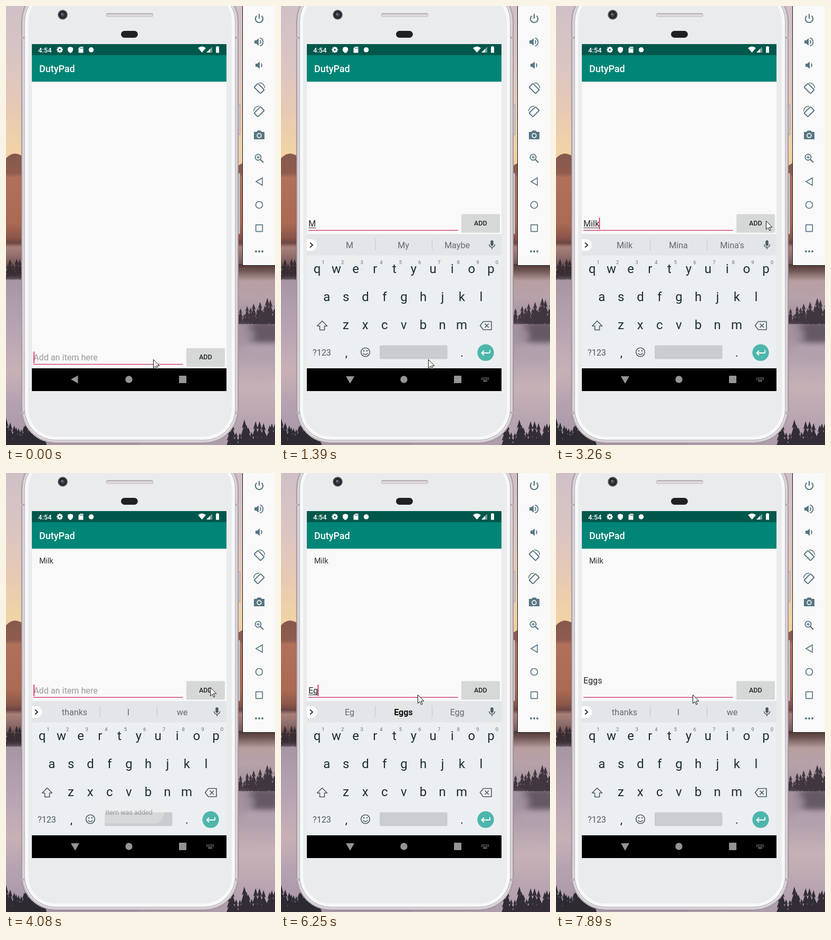
These frames come from a looping animation (510 px wide and 830 px high, 8 s). An HTML page:

```html
<!DOCTYPE html>
<html lang="en">
<head>
<meta charset="utf-8">
<title>To-do list demo</title>
<style>
html, body { margin: 0; height: 100%; overflow: hidden; background: #b9a8b4; }
svg { display: block; }
text { font-family: Roboto, sans-serif; white-space: pre; }
</style>
</head>
<body>
<svg id="stage" width="510" height="830" viewBox="0 0 510 830"></svg>
<script>
const LOOP = 8000;
const stage = document.getElementById('stage');

// Markup helpers
const rect = (x, y, w, h, fill, more = '') => `<rect x="${x}" y="${y}" width="${w}" height="${h}" fill="${fill}" ${more}/>`;
const circle = (x, y, r, fill, more = '') => `<circle cx="${x}" cy="${y}" r="${r}" fill="${fill}" ${more}/>`;
const path = (d, fill, more = '') => `<path d="${d}" fill="${fill}" ${more}/>`;
const line = (d, color, w, more = '') => path(d, 'none', `stroke="${color}" stroke-width="${w}" ${more}`);
const label = (x, y, size, fill, str, more = '') => `<text x="${x}" y="${y}" font-size="${size}" fill="${fill}" ${more}>${str}</text>`;
const group = (inner, more = '') => `<g ${more}>${inner}</g>`;
const at = (x, y, inner) => group(inner, `transform="translate(${x} ${y})"`);
const fog = (x, y, rx, ry, fill, o) => `<ellipse cx="${x}" cy="${y}" rx="${rx}" ry="${ry}" fill="${fill}" opacity="${o}" filter="url(#soft)"/>`;
const mid = 'text-anchor="middle"';

let seed = 7;
const rnd = () => (seed = (seed * 16807) % 2147483647) / 2147483647;

// Overlapping firs between x0 and x1, each with three ragged tiers
function trees(x0, x1, base, height, fill) {
  let d = '';
  for (let x = x0; x < x1; x += 3 + rnd() * 5) {
    const h = height(x) * (0.5 + rnd() * 0.5), w = 3 + h * 0.13;
    d += `M${x} ${base - h}`;
    for (const side of [1, -1]) {
      const tiers = side > 0 ? [0.3, 0.6, 1] : [1, 0.6, 0.3];
      for (const k of tiers) {
        const out = `L${x + side * w * (0.25 + k * 0.75)} ${base - h * (1 - k)}`;
        const notch = `L${x + side * w * k * 0.5} ${base - h * (1 - k) - h * 0.04}`;
        d += side > 0 ? out + notch : notch + out;
      }
    }
    d += 'Z';
  }
  return path(d, fill);
}

function gradient(id, stops) {
  return `<linearGradient id="${id}" x1="0" y1="0" x2="0" y2="830" gradientUnits="userSpaceOnUse">` +
    stops.map(([y, c]) => `<stop offset="${y / 830}" stop-color="${c}"/>`).join('') + '</linearGradient>';
}

function landscape() {
  return `<defs>
    <filter id="soft" x="-50%" y="-100%" width="200%" height="300%"><feGaussianBlur stdDeviation="6"/></filter>
    ${gradient('sky', [[0, '#cfc0c6'], [110, '#dbc5c3'], [200, '#e8cab4'], [275, '#f1d3a6'], [310, '#efcb9c']])}
    ${gradient('hill', [[280, '#86594e'], [316, '#8f5c4f'], [324, '#b0705a'], [410, '#ab6a52'], [438, '#8a564a'], [448, '#6d4644'], [456, '#a98078'], [474, '#8f6d6c'], [500, '#5d4446']])}
    ${gradient('mist', [[490, '#8c7580'], [525, '#a897a5'], [620, '#b9a5b3'], [690, '#c9b0b6'], [750, '#b5a2b1'], [830, '#a695a5']])}
    ${gradient('mistR', [[488, '#4f3838'], [500, '#6d5351'], [520, '#b89e9f'], [550, '#b7a2aa'], [600, '#a08e9b'], [670, '#b4a3af'], [720, '#c7b1b7'], [830, '#ad9cab']])}
    </defs>` +
    rect(0, 0, 510, 830, 'url(#sky)') +
    path('M0 288Q8 279 18 279Q28 280 36 288H430V308L450 296V510H0Z', 'url(#hill)') +
    rect(0, 496, 250, 340, 'url(#mist)') +
    rect(250, 488, 260, 342, 'url(#mistR)') +
    trees(-4, 40, 518, () => 46, '#382d33') +
    fog(16, 526, 34, 9, '#a897a5', 0.9) +
    fog(492, 618, 40, 22, '#564b57', 0.8) +
    trees(436, 514, 602, x => 28 + (x - 436) * 0.4, '#40363f') +
    fog(448, 622, 24, 18, '#a493a1', 0.8) + fog(490, 650, 40, 12, '#b4a3af', 0.8) +
    trees(-4, 76, 836, x => 60 - x * 0.2, '#2d2a32') +
    trees(424, 514, 836, () => 54, '#322d36');
}

function phone() {
  const shell = (d, fill, more) => rect(29 + d, -36 + d, 412 - 2 * d, 863 - 2 * d, fill, `rx="${65 - d}" ${more || ''}`);
  return rect(440, 187, 3.5, 56, '#d8d3d8', 'stroke="#8f868e" stroke-width=".8"') +
    rect(440, 316, 3.5, 115, '#d8d3d8', 'stroke="#8f868e" stroke-width=".8"') +
    shell(0.5, '#cfc8ce', 'stroke="#897f87"') +
    shell(3, '#e9e5e9', 'stroke="#b5acb4" stroke-width=".8"') +
    shell(6, '#f4f3f5', 'stroke="#9f969e"') +
    shell(8, '#f7f8f9') +
    shell(13, '#e9ebed') +
    [58, 767].map(y => rect(29, y, 7, 4, '#b9b0b8') + rect(434, y, 7, 4, '#b9b0b8')).join('') +
    circle(107.5, 16.5, 9.3, '#55535a') + circle(107.5, 16.5, 7.3, '#26272c') +
    circle(107.5, 16.5, 3.6, '#474b58') + circle(106, 15, 1.3, '#9297a5') +
    rect(190.5, 14, 88, 6, '#dedadd', 'rx="2" stroke="#bdb5ba"') +
    rect(191, 14, 87, 1.4, '#a9a1a6') +
    rect(218, 47, 32, 13, '#202124', 'rx="6.5"');
}

function appBars() {
  let gear = '';
  for (let a = 0; a < 360; a += 45) gear += rect(-1.3, -5.8, 2.6, 4, '#fff', `transform="rotate(${a})"`);
  return rect(49, 72, 369, 613, '#f9f9f9') + rect(49, 143, 369, 1.5, '#e6eceb') +
    rect(49, 72, 369, 21, '#00574b') + rect(49, 93, 369, 50, '#008577') +
    label(61, 87.5, 13, '#fff', '4:54', 'font-weight="500"') +
    at(102, 82.7, gear + circle(0, 0, 3.2, 'none', 'stroke="#fff" stroke-width="2.4"')) +
    path('M122 77L127 79V83Q126.500 87 122 89Q117.500 87 117 83V79Z', '#fff') +
    path('M140.500 77H146.500V88.500H137.500V80Z', '#fff') +
    line('M141 78.500V81M143 78.500V81M145 78.500V81', '#00574b', 0.9) +
    circle(161.5, 82.8, 4.8, '#fff') +
    path('M364 79.500Q371.500 73.500 379 79.500L371.500 88Z', '#fff') +
    path('M391 77V88H380Z', '#6f9f97') + path('M387 81V88H380Z', '#fff') +
    path('M399.500 77V76H402.500V77H404V88.500H398V77Z', '#fff') +
    label(63, 125.3, 17.96, '#fff', 'DutyPad', 'font-weight="500"');
}

function sidePanel() {
  const c = '#587682';
  const speaker = path('M-7 -3H-3.500L1 -7V7L-3.500 3H-7Z', c);
  const turn = rect(-5, -8.5, 10, 17, 'none', `rx="1" stroke="${c}" stroke-width="2" transform="rotate(-45)"`) +
    line('M0 -10.700Q9.500 -10.500 10.700 -1', c, 1.5);
  const icons = [
    line('M-4.600 -5.500A7.200 7.200 0 1 0 4.600 -5.500M0 -9V0', c, 2.2),
    at(-2, 0, speaker + line('M3.500 -3.500Q6.500 0 3.500 3.500M3.500 -7.700A8 8 0 0 1 3.500 7.700', c, 1.8)),
    speaker + line('M3.500 -3.500Q6.500 0 3.500 3.500', c, 1.8),
    turn,
    group(turn, 'transform="scale(-1 1)"'),
    path('M-10 -6H-5L-3 -8.500H3L5 -6H10V8H-10Z', c) + circle(0, 1, 4.7, '#f9f9f9') + circle(0, 1, 3, c),
    circle(-2, -2, 5.6, 'none', `stroke="${c}" stroke-width="1.8"`) + line('M2 2L8 8', c, 2.4) + line('M-5 -2H1M-2 -5V1', c, 1.3),
    line('M-6 0L6 -7V7Z', c, 1.6),
    circle(0, 0, 6.5, 'none', `stroke="${c}" stroke-width="1.7"`),
    rect(-6.3, -6.3, 12.6, 12.6, 'none', `stroke="${c}" stroke-width="1.7" rx=".6"`),
    [-6, 0, 6].map(x => circle(x, 0, 2, c)).join('')
  ];
  return rect(448.5, -2, 64, 492.5, '#f9f9f9', 'stroke="#111"') +
    icons.map((icon, i) => at(480, 24 + 44 * i, icon)).join('');
}

function keys(caps) {
  const step = 36.6, ink = '#1d2c33';
  const row = (letters, x, y) => [...letters].map((k, i) =>
    label(x + step * i, y, 24, ink, caps ? k.toUpperCase() : k, mid)).join('');
  const digits = [...'1234567890'].map((k, i) => label(80 + step * i, 488, 9.5, '#657076', k, mid)).join('');
  return row('qwertyuiop', 68.5, 505) + digits + row('asdfghjkl', 86.7, 557.7) + row('zxcvbnm', 123, 610.5) +
    path('M78 595.500L87.500 605H82.500V612.500H73.500V605H68.500Z', caps ? '#4d5a61' : 'none',
      'stroke="#4d5a61" stroke-width="1.6" stroke-linejoin="round"');
}

function keyboard() {
  const c = '#4d5a61';
  return rect(49, 431, 369, 254, '#ebeff1') + rect(49, 431, 369, 40.5, '#e2e6e9') +
    path('M49 441H57A11 11 0 0 1 57 463H49Z', '#fff') +
    line('M55 447.500L60 452L55 456.500', '#222', 1.7) +
    line('M178.500 440V462M286.500 440V462', '#c3c8cb', 1) +
    rect(397.3, 443, 5.4, 10.5, c, 'rx="2.7"') + line('M394.500 450.500Q395 456 400 456Q405 456 405.500 450.500M400 456V460', c, 1.5) +
    '<g id="sug"></g><g id="keys"></g>' +
    line('M383.500 596.500H399V612H383.500L377.500 604.200Z', c, 1.6, 'stroke-linejoin="round"') +
    line('M386.500 600.500L394 608M394 600.500L386.500 608', c, 1.6) +
    label(77.5, 660.5, 16.2, c, '?123', mid) + label(124, 663, 22, '#1d2c33', ',', mid) + label(343, 663, 22, '#1d2c33', '.', mid) +
    circle(160, 654.5, 8.3, 'none', `stroke="${c}" stroke-width="1.6"`) +
    circle(157, 652, 1.3, c) + circle(163, 652, 1.3, c) + line('M155.500 656.500Q160 662 164.500 656.500', c, 1.4) +
    rect(187, 641.5, 128.5, 26, '#c9cdd0', 'rx="2.5"') +
    circle(388, 655.3, 15.7, '#4db6ac') +
    line('M396 650.500V656H381M385 651.500L380.500 656L385 660.500', '#fff', 1.8);
}

function navBar() {
  const g = '#959595';
  let pad = '';
  for (let r = 0; r < 2; r++) for (let i = 0; i < 5; i++) pad += rect(380 + i * 3, 702.5 + r * 2.7, 1.7, 1.6, g);
  return rect(49, 685, 369, 43, '#000') +
    path('M136.500 698.500V713.500L123 706Z', g, 'id="back"') +
    group(path('M123 700H139L131 714Z', g) + pad + rect(383, 708.2, 8, 1.6, g), 'id="hide"') +
    circle(233, 706, 6.7, g) + rect(328, 699, 14, 14, g, 'rx=".8"');
}

const inputRow = () =>
  line('M52 424.200H335.500', '#d14a7c', 1.5) +
  rect(342, 394.5, 73, 34.5, '#000', 'rx="2" opacity=".1"') +
  rect(342, 393.5, 73, 34, '#d6d7d7', 'rx="2"') +
  circle(387, 411, 30, '#000', 'id="ripple" clip-path="url(#button)"') +
  label(378.3, 415, 12.57, '#242424', 'ADD', 'text-anchor="middle" font-weight="500"') +
  label(52, 417, 16.16, '#9a9a9a', 'Add an item here', 'id="hint"') +
  label(52, 417, 16.16, '#262626', '', 'id="entry"') +
  rect(52, 419, 0, 1, '#333', 'id="under"') +
  rect(52.2, 400, 1.6, 22, '#d81b60', 'id="caret"');

stage.innerHTML = landscape() + phone() + appBars() + sidePanel() +
  '<clipPath id="button"><rect x="342" y="393.500" width="73" height="34" rx="2"/></clipPath>' +
  label(63, 170.5, 14.37, '#333', 'Milk', 'id="item"') +
  group(inputRow(), 'id="row"') + navBar() + group(keyboard(), 'id="kb"') +
  group(rect(168, 622, 131.5, 41, '#eeeeee', 'rx="20.500"') + label(233.3, 646, 12.57, '#2b2b2b', 'Item was added', mid), 'id="toast"') +
  group(path('M0 0V16L3.800 12.600L6.300 18.300L8.500 17.300L6.100 11.700H11.300Z', '#fff', 'stroke="#111" stroke-linejoin="round"'), 'id="mouse"');

const ui = {};
stage.querySelectorAll('[id]').forEach(el => ui[el.id] = el);

const idle = ['thanks', 'I', 'we'];
const start = {
  text: '', caret: true, kb: false, nav: false, drop: 0, caps: false, sug: idle, bold: false,
  mouse: [279, 668], item: false, toast: 0, ripple: [0, 0], lift: 0, compose: true
};

// What changes, and when
const steps = [
  [280, { caret: false, nav: true }],
  [560, { caret: true, kb: true, drop: 1 }],
  [680, { drop: 0, caps: true }],
  [830, { text: 'M', caps: false, sug: ['M', 'My', 'Maybe'] }],
  [1390, { caret: false }],
  [1520, { text: 'Mi', caret: true, sug: ['Mi', 'Might', 'Miss'] }],
  [1790, { text: 'Mil', sug: ['Mil', 'Might', 'Miss'] }],
  [2040, { text: 'Milk', sug: ['Milk', 'Mina', "Mina's"] }],
  [2470, { caret: false }],
  [2750, { mouse: [322, 585] }],
  [2870, { mouse: [405, 470] }],
  [2990, { mouse: [438, 421], caret: true }],
  [3140, { mouse: [420, 409] }],
  [3260, { mouse: [398, 406] }],
  [3380, { mouse: [390, 405] }],
  [3500, { mouse: [387, 405], caret: false }],
  [3650, { ripple: [30, 0.16] }],
  [3800, { ripple: [50, 0.2] }],
  [3930, { ripple: [50, 0.1], text: '', caret: true, sug: idle }],
  [4080, { ripple: [0, 0], item: true, toast: 0.36 }],
  [4210, { toast: 0.65, caret: false }],
  [4350, { toast: 0.88 }],
  [4480, { toast: 1 }],
  [4630, { mouse: [345, 412] }],
  [4750, { mouse: [290, 419], caret: true }],
  [4900, { mouse: [268, 419] }],
  [5020, { mouse: [259, 419] }],
  [5300, { caret: false }],
  [5710, { caret: true }],
  [5980, { text: 'E', sug: ['E', 'Eggs', 'Even'], toast: 0.65 }],
  [6120, { text: 'Eg', toast: 0.3 }],
  [6250, { sug: ['Eg', 'Eggs', 'Egg'], bold: true, toast: 0 }],
  [6400, { text: 'Egg', sug: ['Egg', 'Eggs', 'Eggshell'], bold: false }],
  [6520, { text: 'Eggs', sug: ['Eggs', 'Egg', 'Eggshells'] }],
  [6950, { caret: false }],
  [7230, { lift: 19, compose: false, caret: true }],
  [7360, { sug: idle }],
  [7890, { caret: false }]
];

const set = (el, attrs) => Object.entries(attrs).forEach(([k, v]) => el.setAttribute(k, v));
const show = (el, on) => el.setAttribute('visibility', on ? 'visible' : 'hidden');
const move = (el, x, y) => el.setAttribute('transform', `translate(${x} ${y})`);

function render(t) {
  const s = Object.assign({}, start, ...steps.filter(([time]) => time <= t).map(([, change]) => change));
  move(ui.row, 0, s.kb ? 0 : 253.4);
  ui.kb.setAttribute('display', s.kb ? 'inline' : 'none');
  move(ui.kb, 0, s.drop);
  show(ui.back, !s.nav);
  show(ui.hide, s.nav);
  show(ui.item, s.item);
  show(ui.hint, !s.text);
  ui.entry.textContent = s.text;
  ui.entry.setAttribute('y', 417 - s.lift);
  const width = s.text ? ui.entry.getComputedTextLength() : 0;
  ui.under.setAttribute('width', s.compose ? width : 0);
  ui.caret.setAttribute('x', s.lift ? 52.2 : Math.max(52.2, 51.5 + width));
  show(ui.caret, s.caret);
  ui.sug.innerHTML = s.sug.map((word, i) => {
    const strong = s.bold && i === 1;
    return label([130, 232, 334][i], 457.5, 16.16, strong ? '#111' : '#626a6f', word, `text-anchor="middle" font-weight="${strong ? 700 : 400}"`);
  }).join('');
  ui.keys.innerHTML = keys(s.caps);
  set(ui.ripple, { r: s.ripple[0], opacity: s.ripple[1] });
  ui.toast.setAttribute('opacity', s.toast);
  move(ui.mouse, s.mouse[0] + 0.5, s.mouse[1] + 0.5);
}

let t0, last = -1;
function tick(now) {
  t0 ??= now;
  const t = (now - t0) % LOOP;
  const count = steps.filter(([time]) => time <= t).length;
  if (count !== last) render(t);
  last = count;
  requestAnimationFrame(tick);
}
render(0);
requestAnimationFrame(tick);
</script>
</body>
</html>
```
